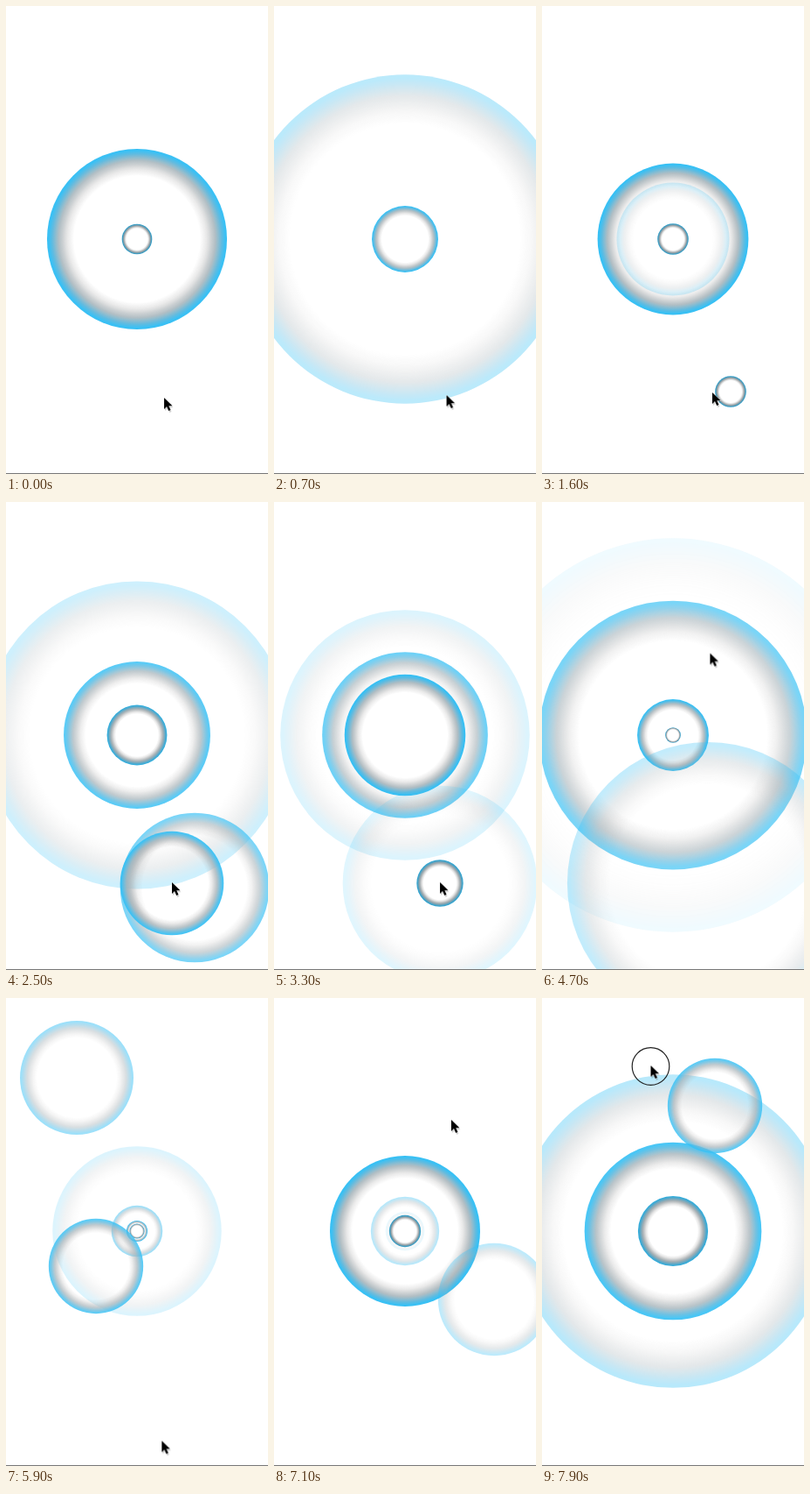
An HTML page without scripts for the animation above (8000 ms loop, 300 by 534 pixels).

```html
<!DOCTYPE html>
<html lang="en">
<head>
<meta charset="utf-8">
<title>Pulses</title>
<style>
html, body { margin: 0; width: 100%; height: 100%; overflow: hidden; background: #fff; }
svg { display: block; width: 100vw; height: 100vh; }

/* Each ring: --at birth, --from and --to radius over two seconds of the loop */
.ring {
  --from: 17px;
  r: 0;
  opacity: 0;
  fill: url(#glow);
  animation: grow 8s linear var(--at) infinite, fade 8s linear var(--at) infinite;
}
.brief { animation-name: grow, fade-brief; }
.early { animation: early 8s step-end infinite; }
.late { animation: late 8s step-end infinite; }
.cursor { animation: wander 8s linear infinite; }
.press { opacity: 0; animation: press 8s step-end infinite; }

@keyframes grow {
  0% { r: var(--from); filter: brightness(.82); }
  6% { filter: brightness(1); }
  25%, 100% { r: var(--to); filter: brightness(1); }
}
@keyframes fade {
  0%, 8.75% { opacity: 1; }
  13% { opacity: .72; }
  17.5% { opacity: .35; }
  20% { opacity: .25; }
  23.3% { opacity: .08; }
  25%, 100% { opacity: 0; }
}
@keyframes fade-brief {
  0%, 7% { opacity: 1; }
  10.4% { opacity: .78; }
  14% { opacity: .35; }
  18.2% { opacity: .15; }
  20%, 100% { opacity: 0; }
}
@keyframes early { 0% { visibility: visible; } 50%, 100% { visibility: hidden; } }
@keyframes late { 0% { visibility: hidden; } 50%, 100% { visibility: visible; } }
@keyframes press { 0% { opacity: 0; } 98.6%, 100% { opacity: 1; } }
@keyframes wander {
  0% { transform: translate(181px, 447px); }
  17.5% { transform: translate(214px, 441px); }
  20% { transform: translate(195px, 441px); }
  23%, 41.25% { transform: translate(190px, 434px); }
  58.75% { transform: translate(193px, 173px); }
  61% { transform: translate(81px, 91px); }
  63.9% { transform: translate(103px, 306px); }
  73.75% { transform: translate(178px, 506px); }
  76.25% { transform: translate(252px, 344px); }
  88.75% { transform: translate(203px, 139px); }
  97.5% { transform: translate(128px, 83px); }
  98.75%, 100% { transform: translate(124.5px, 77px); }
}
</style>
</head>
<body>
<svg viewBox="0 0 300 534" preserveAspectRatio="none">
  <defs>
    <radialGradient id="glow">
      <stop offset=".7" stop-color="#aaa" stop-opacity="0"/>
      <stop offset=".77" stop-color="#aaa" stop-opacity=".25"/>
      <stop offset=".87" stop-color="#a3b2b9" stop-opacity=".85"/>
      <stop offset=".94" stop-color="#62bbdf"/>
      <stop offset=".98" stop-color="#38c0f4"/>
      <stop offset="1" stop-color="#38c0f4"/>
    </radialGradient>
  </defs>
  <rect width="300" height="534" fill="#fff"/>

  <!-- Pulses from the centre -->
  <g transform="translate(150 266)">
    <g class="early">
      <circle class="ring" style="--at:-.71s;--to:259px"/>
      <circle class="ring" style="--at:-.01s;--to:76px"/>
    </g>
    <circle class="ring" style="--at:.9s;--to:215px"/>
    <circle class="ring" style="--at:1.59s;--to:164px"/>
    <circle class="ring" style="--at:2.27s;--to:168px"/>
    <circle class="ring" style="--at:2.83s;--to:239px"/>
    <circle class="ring" style="--at:3.61s;--to:267px"/>
    <circle class="ring" style="--at:4.186s;--to:110px"/>
    <circle class="ring" style="--at:4.65s;--from:8px;--to:42px"/>
    <circle class="ring" style="--at:5.3s;--from:7px;--to:24px"/>
    <circle class="ring" style="--at:5.72s;--from:4px;--to:55px"/>
    <g class="late">
      <circle class="ring" style="--at:6.506s;--to:249px"/>
      <circle class="ring" style="--at:7.09s;--to:225px"/>
      <circle class="ring" style="--at:7.7s;--to:247px"/>
    </g>
  </g>

  <!-- Pulses left by the pointer -->
  <circle class="ring brief" cx="216" cy="440" style="--at:1.59s;--to:167px"/>
  <circle class="ring brief" cx="190" cy="435" style="--at:1.85s;--to:147px"/>
  <circle class="ring" cx="190" cy="435" style="--at:3.2s;--to:209px"/>
  <circle class="ring brief" cx="81" cy="91" style="--at:4.88s;--to:111px"/>
  <circle class="ring brief" cx="103" cy="306" style="--at:5.11s;--to:111px"/>
  <circle class="ring brief" cx="252" cy="344" style="--at:5.95s;--to:99px"/>
  <g class="late">
    <circle class="ring brief" cx="198" cy="123" style="--at:7.11s;--to:111px"/>
  </g>

  <rect y="533" width="300" height="1" fill="#777"/>
  <circle class="press" cx="124.5" cy="78" r="21.3" fill="none" stroke="#222" stroke-width="1.2"/>
  <g class="cursor">
    <path d="M1 2v13l3-3 2.2 5 2.3-1-2.2-4.800h4.200z" fill="#000" opacity=".18"/>
    <path d="M0 0v13l3-2.900 2.200 5 2.300-1-2.200-4.800h4.200z" fill="#000" stroke="#fff" stroke-width=".8" paint-order="stroke"/>
  </g>
</svg>
</body>
</html>
```
